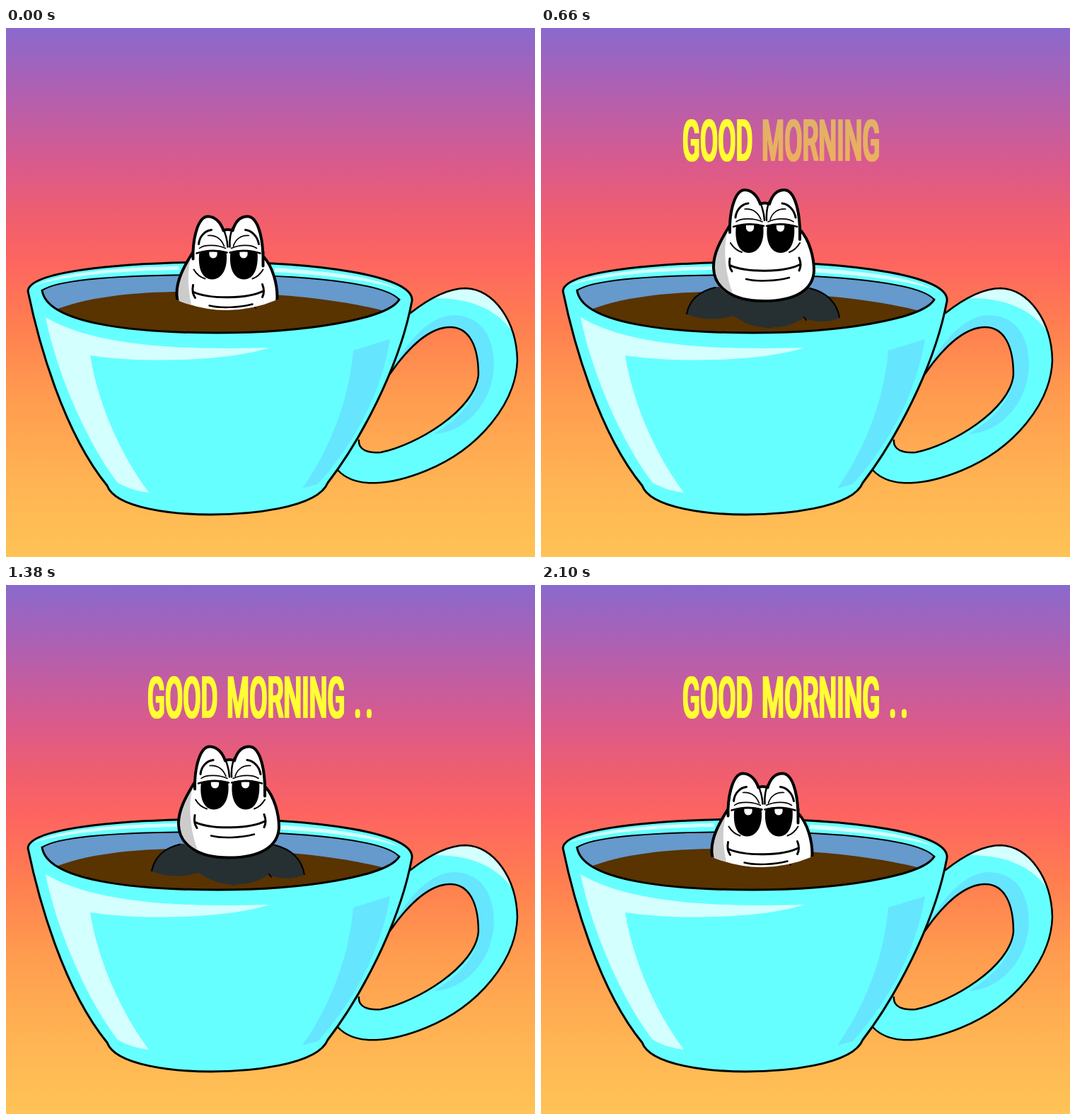
Animation, 748 px wide and 748 px high, one loop 2130 ms. Source, as an HTML page:

```html
<!DOCTYPE html>
<html lang="en">
<head>
<meta charset="utf-8">
<title>Good morning</title>
<style>
  html, body { margin: 0; width: 100%; height: 100%; overflow: hidden; }
  svg { display: block; width: 100vw; height: 100vh; }
  .line { fill: none; stroke: #000; stroke-linecap: round; stroke-linejoin: round; }
  .cyan { fill: #66ffff; }
  .light { fill: #d3ffff; }
  .shade { fill: #66e5ff; }
  text { font: 500 79px Roboto, sans-serif; fill: #ffff33; word-spacing: 8px; }
</style>
</head>
<body>
<svg viewBox="0 0 748 748">
  <defs>
    <linearGradient id="sky" x1="0" y1="0" x2="0" y2="1">
      <stop offset="0" stop-color="#8a69cd"/>
      <stop offset=".134" stop-color="#b45fae"/>
      <stop offset=".267" stop-color="#dc5a8a"/>
      <stop offset=".35" stop-color="#ee5e70"/>
      <stop offset=".44" stop-color="#fe6560"/>
      <stop offset=".56" stop-color="#ff7e50"/>
      <stop offset=".7" stop-color="#ff9c4f"/>
      <stop offset=".86" stop-color="#ffb453"/>
      <stop offset="1" stop-color="#ffc356"/>
    </linearGradient>
    <filter id="bold" x="-5%" y="-20%" width="110%" height="140%">
      <feMorphology operator="dilate" radius="1 1"/>
    </filter>
    <clipPath id="dry"><path d="M200 150H430V384H384Q312 414 240 384H200Z"/></clipPath>
    <clipPath id="opening">
      <path d="M51 371C75 354 180 349 290 349C420 349 535 360 556 384C540 412 420 431 300 431C180 431 58 418 51 371Z"/>
    </clipPath>
  </defs>

  <rect width="748" height="748" fill="url(#sky)"/>

  <g id="handle">
    <path class="cyan" d="M572 403C600 381 626 368 650 368C690 369 722 415 723 470C721 530 670 595 594 626C545 646 495 652 470 626L440 600L480 578L499 583C498 595 510 602 530 600C580 590 664 540 668 490C668 450 655 423 628 423C600 423 570 450 543 489Z"/>
    <path class="light" d="M604 382C622 372 636 368 650 368C680 369 704 394 715 428C696 401 660 381 604 382Z"/>
    <path class="shade" d="M551 474C580 425 610 405 635 406C675 408 690 440 690 478C688 530 650 572 605 574C645 550 668 520 668 490C668 450 655 423 628 423C600 423 570 450 543 489Z"/>
    <path class="line" stroke-width="2.5" d="M572 403C600 381 626 368 650 368C690 369 722 415 723 470C721 530 670 595 594 626C545 646 495 652 470 626M499 583C498 595 510 602 530 600C580 590 664 540 668 490C668 450 655 423 628 423C600 423 570 450 543 489"/>
  </g>

  <g id="cup">
    <path class="cyan" stroke="#000" stroke-width="3" stroke-linejoin="round" d="M31 372C33 345 150 332 295 331C440 331 578 350 574 386C556 482 499 586 455 643C440 680 340 688 290 688C240 688 155 680 143 647C80 570 45 440 31 372Z"/>
    <path class="light" d="M40 364C75 346 160 338 245 337V342C160 343 85 350 40 364ZM380 339C450 343 525 352 556 370C515 356 450 349 380 345Z"/>
    <path class="light" d="M56 409C125 450 250 456 372 452C320 470 200 475 119 463C130 530 160 600 202 657C185 655 170 650 158 643C110 580 70 480 56 409Z"/>
    <path class="shade" d="M543 440L491 456C485 530 455 600 419 651L441 645C490 590 530 520 543 440Z"/>
    <g clip-path="url(#opening)">
      <rect x="45" y="340" width="520" height="100" fill="#6699cc"/>
      <path fill="#593300" d="M66 400C110 381 180 373 250 373C350 373 460 379 546 403V440H66Z"/>
    </g>
    <path class="line" stroke-width="2" d="M51 371C75 354 180 349 290 349C420 349 535 360 556 384"/>
    <path class="line" stroke-width="3" d="M51 371C58 418 180 431 300 431C420 431 540 412 556 384"/>
  </g>

  <path id="body" fill="#263033" stroke="#263033" stroke-width="2" stroke-linejoin="round"/>
  <path id="trim" class="line" stroke-width="2"/>

  <g clip-path="url(#dry)">
    <g id="head">
      <path fill="#fff" d="M267 254C268 230 275 204 288 204C298 204 306 212 310 224C314 222 318 222 323 224C327 210 335 204 344 204C357 204 365 228 366 260C380 275 386 300 386 318C385 345 360 361 315 361C270 361 245 342 244 315C243 295 254 275 267 254Z"/>
      <path fill="#ccc" d="M264 262C256 290 262 330 273 355C255 349 244 336 244 315C244 295 252 277 264 262Z"/>
      <path class="line" stroke-width="4" d="M267 254C268 230 275 204 288 204C298 204 306 212 310 224C314 222 318 222 323 224C327 210 335 204 344 204C357 204 365 228 366 260C380 275 386 300 386 318C385 345 360 361 315 361C270 361 245 342 244 315C243 295 254 275 267 254V264M366 254V274"/>
      <path d="M276 254Q295 249 314 254C317 277 308 293 294 293C280 293 273 277 276 254ZM320 254Q339 249 358 254C360 277 353 293 339 293C325 293 317 277 320 254Z"/>
      <path fill="#fff" d="M290 254H301C302 260 299 263 295.500 263S289 260 290 254ZM333 254H344C345 260 342 263 338.500 263S332 260 333 254Z"/>
      <path class="line" stroke-width="2.500" d="M272 256Q294 249 315 255M319 255Q340 249 362 256M309 220Q315 232 316 247M323 220Q318 232 319 247"/>
      <path class="line" stroke-width="1.600" d="M276 249C283 243 302 244 313 249M321 249C332 244 349 243 357 249M288 231C299 230 307 236 311 246M324 246C327 236 335 230 346 231"/>
      <path class="line" stroke-width="3" d="M275 243C276 232 284 224 293 223M341 223C350 224 358 232 360 243"/>
      <path class="line" stroke-width="2" d="M268 279Q274 289 284 292M351 292Q360 289 366 279"/>
      <path class="line" stroke-width="3" d="M268 311C290 321 345 321 367 309M267 301Q265 312 270 319M365 300Q369 310 365 318"/>
      <path class="line" stroke-width="2.500" d="M290 330C305 334 332 333 351 328"/>
    </g>
  </g>

  <g filter="url(#bold)">
    <text transform="translate(200 187) scale(.463 1)"><tspan class="word">GOOD</tspan> <tspan class="word">MORNING</tspan> <tspan class="word" letter-spacing="13">..</tspan></text>
  </g>
</svg>
<script>
const LOOP = 2130, STEP = 30;
const $ = id => document.getElementById(id);
const words = document.querySelectorAll('.word');

// Start and end of each word's fade
const fades = [[90, 360], [510, 800], [900, 1150]];

// Body outline: left tip, left shoulder, right shoulder, right tip,
// right notch, middle lobe, left notch, lobe bulge
const sunk = [262, 378, 270, 370, 360, 370, 368, 380, 350, 392, 315, 396, 285, 391, 0];
const high = [217, 408, 246, 348, 380, 348, 410, 406, 370, 385, 320, 419, 287, 376, -5];
const low = [206, 404, 246, 367, 380, 368, 422, 409, 372, 409, 322, 424, 272, 406, 5];
const raised = [211, 404, 248, 356, 378, 356, 416, 408, 370, 400, 318, 416, 282, 396, -1];

// Time, head drop, head shift, body pose
const keys = [
  [0, 62.5, -2.5, sunk],
  [290, -0.5, 0, high],
  [650, 25, 0, low],
  [1040, 7, 0, raised],
  [1420, 25, 0, low],
  [1770, 7, 0, raised],
  [2080, 62.5, -2.5, sunk],
  [LOOP, 62.5, -2.5, sunk]
];

const mix = (a, b, p) => a + (b - a) * p;
const clamp = v => Math.min(1, Math.max(0, v));
const ease = p => (1 - Math.cos(Math.PI * p)) / 2;

function drawBody(pose) {
  const [lx, ly, ax, ay, bx, by, rx, ry, nx, ny, cx, cy, mx, my, bulge] = pose;
  const left = `M${lx} ${ly}Q${lx + 6} ${ay + 8} ${ax} ${ay}`;
  const right = `${bx} ${by}Q${rx - 6} ${by + 9} ${rx} ${ry}`;
  const lobe = (x, y) => `${(x + cx) / 2} ${(y + cy) / 2 + bulge * 1.5}`;
  $('body').setAttribute('d', `${left}L${right}
    Q${(rx + nx) / 2} ${(ry + ny) / 2 + 10} ${nx} ${ny}
    Q${lobe(nx, ny)} ${cx + 7} ${cy - 2}Q${cx} ${cy + 2} ${cx - 7} ${cy - 2}
    Q${lobe(mx, my)} ${mx} ${my}
    Q${(lx + mx) / 2} ${(ly + my) / 2 + 11} ${lx} ${ly}Z`);
  $('trim').setAttribute('d', `${left}M${right}M${nx} ${ny}l3 4`);
}

function draw(time) {
  const t = Math.floor((time % LOOP) / STEP) * STEP;
  const i = keys.findIndex((k, n) => n > 0 && t < k[0]);
  const [t0, y0, x0, from] = keys[i - 1];
  const [t1, y1, x1, to] = keys[i];
  const p = ease((t - t0) / (t1 - t0));

  $('head').setAttribute('transform', `translate(${mix(x0, x1, p)} ${mix(y0, y1, p)})`);
  drawBody(from.map((v, n) => mix(v, to[n], p)));
  fades.forEach(([start, end], n) => {
    words[n].setAttribute('fill-opacity', clamp((t - start) / (end - start)));
  });
}

function tick() {
  draw(performance.now());
  requestAnimationFrame(tick);
}
tick();
</script>
</body>
</html>
```
